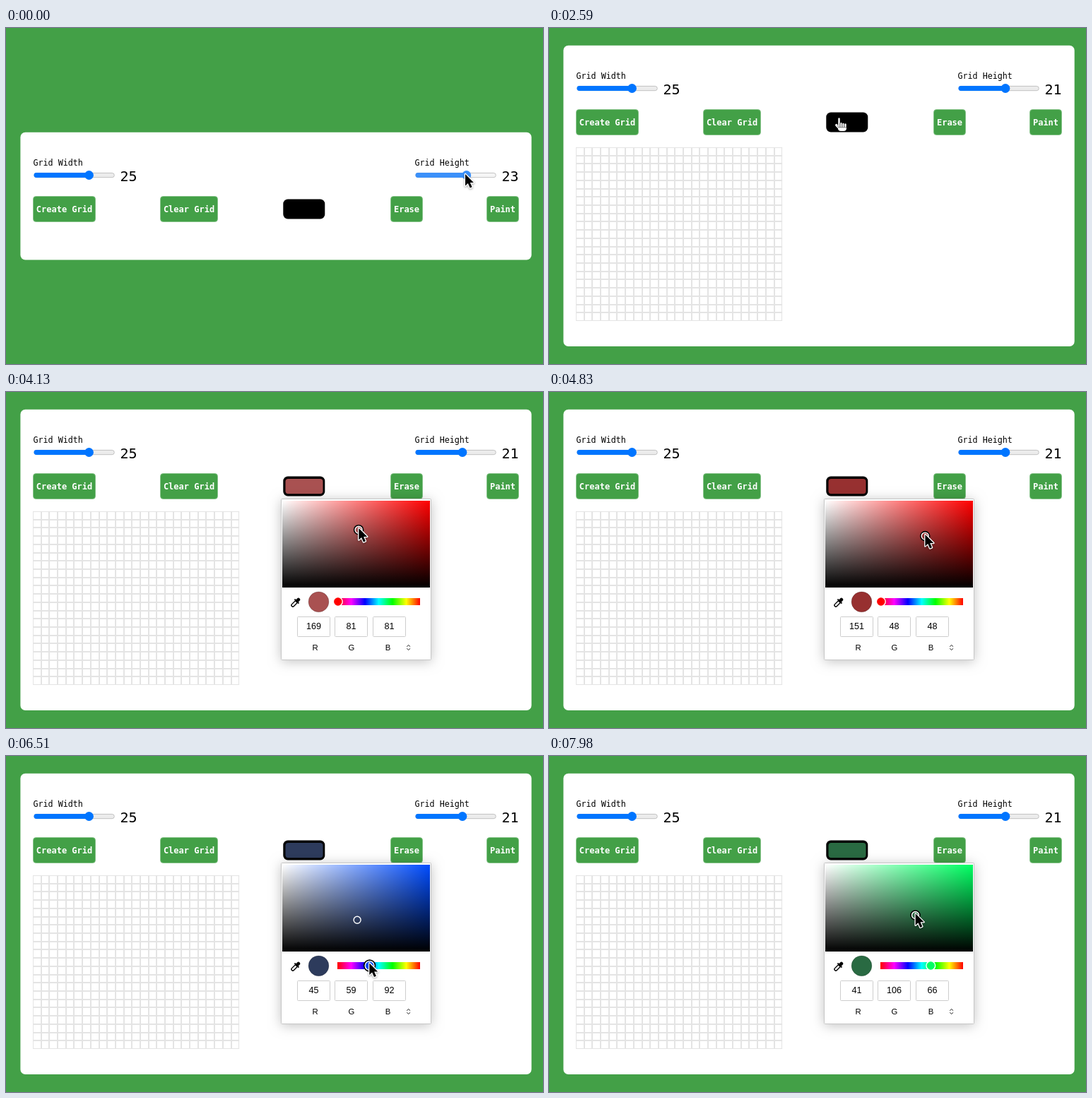
Write an HTML page with a canvas that moves like this. It is 760x476 px and loops after 8000 ms.

```html
<!DOCTYPE html>
<html lang="en">
<head>
<meta charset="utf-8">
<title>Pixel grid</title>
<style>
html, body { margin: 0; width: 100%; height: 100%; overflow: hidden; background: #43a047; }
canvas { display: block; }
</style>
</head>
<body>
<canvas id="stage" width="760" height="476"></canvas>
<script>
const ctx = document.getElementById('stage').getContext('2d');
const LOOP = 8000, STEP = 70;
const GREEN = '#43a047', BLUE = '#0075ff';
const MONO = '"DejaVu Sans Mono", monospace';
const SANS = '"Liberation Sans", Arial, sans-serif';

// Moments of the session, in ms
const RELEASE = 700, CREATE = 1960, OPEN = 2870;
const PRESS = 3500, LIFT = 6090, HUE_PRESS = 6300, HUE_LIFT = 7140, PRESS_AGAIN = 7560;

const AREA = { x: 391, y: 154, w: 209, h: 123 };
const HUE = { x: 469, y: 292, w: 117, h: 10 };

// Pointer moves: start, end, then where it arrives
const HOME = { x: 650, y: 207 };
const MOVES = [
  [210, 490, 644, 208],
  [630, 1260, 88, 263],
  [1330, 1680, 93, 258.5],
  [2100, 2310, 400, 163],
  [2380, 2590, 411, 128],
  [2800, PRESS, 450, 212],
  [PRESS, 4130, 499.3, 193],
  [4270, 5110, 544, 205],
  [5180, 5530, 529.8, 226.7],
  [5530, LIFT, 497.3, 230.1],
  [LIFT, HUE_PRESS, 470, 294],
  [HUE_PRESS, 6510, 514.3, 293.5],
  [6510, HUE_LIFT, 540, 294],
  [7210, 7490, 545, 240],
  [7490, 7980, 518.7, 223.3]
];

const clamp = (v, lo, hi) => Math.min(hi, Math.max(lo, v));
const ease = k => k * k * (3 - 2 * k);

function pointer(t) {
  let { x, y } = HOME;
  for (const [from, to, endX, endY] of MOVES) {
    const k = ease(clamp((t - from) / (to - from), 0, 1));
    x += (endX - x) * k;
    y += (endY - y) * k;
  }
  return { x, y };
}

function hsv(h, s, v) {
  const part = n => {
    const k = (n + h / 60) % 6;
    return Math.round(255 * v * (1 - s * clamp(Math.min(k, 4 - k), 0, 1)));
  };
  return [part(5), part(3), part(1)];
}
const css = c => `rgb(${c.join()})`;

function pickedColor(t) {
  let hue = 360, s = 0, v = 0;
  if (t >= HUE_PRESS) {
    const x = pointer(Math.min(t, HUE_LIFT)).x - 0.5;
    hue = 360 * (1 - clamp((x - HUE.x) / HUE.w, 0, 1));
  }
  if (t >= PRESS) {
    const p = pointer(t < PRESS_AGAIN ? Math.min(t, LIFT) : t);
    s = clamp((p.x + 0.5 - AREA.x) / AREA.w, 0, 1);
    v = 1 - clamp((p.y + 2.5 - AREA.y) / AREA.h, 0, 1);
  }
  return { hue, s, v, rgb: hsv(hue, s, v) };
}

function paint(fill, stroke, line) {
  if (fill) { ctx.fillStyle = fill; ctx.fill(); }
  if (stroke) { ctx.strokeStyle = stroke; ctx.lineWidth = line; ctx.stroke(); }
}

function box(x, y, w, h, r, fill, stroke, line = 1) {
  ctx.beginPath();
  ctx.roundRect(x, y, w, h, r);
  paint(fill, stroke, line);
}

function disc(x, y, r, fill, stroke, line = 1) {
  ctx.beginPath();
  ctx.arc(x, y, r, 0, Math.PI * 2);
  paint(fill, stroke, line);
}

function text(str, x, y, font, color = '#000', align = 'left') {
  ctx.font = font;
  ctx.fillStyle = color;
  ctx.textAlign = align;
  ctx.fillText(str, x, y);
}

function slider(label, value, x, top, pressed) {
  const color = pressed ? '#3b90f9' : BLUE;
  const thumb = x + 6 + value * 2.88;
  text(label, x - 1, top + 47, '11.7px ' + MONO);
  box(x + 0.4, top + 57.4, 113.4, 6.3, 3.2, pressed ? '#f5f5f5' : '#ececec', '#b5b5b5', 0.8);
  box(x, top + 57.1, thumb - x, 6.9, 3.4, color);
  disc(thumb, top + 60.5, 6.4, color);
  text(value, x + 122, top + 69, '20px ' + MONO);
}

function button(label, x, w, top) {
  box(x, top + 90.5, w, 36, 4, GREEN, '#7fc183', 0.8);
  text(label, x + w / 2, top + 113, 'bold 12px ' + MONO, '#fff', 'center');
}

function grid(x, y, cols, rows, w, h) {
  ctx.fillStyle = '#e4e4e4';
  const lines = (n, size, drawLine) => {
    for (let i = 0; i <= n; i++) drawLine(Math.round(i * size / n) - (i ? 1 : 0), i % n ? 2 : 1);
  };
  lines(cols, w, (at, thick) => ctx.fillRect(x + at, y, thick, h));
  lines(rows, h, (at, thick) => ctx.fillRect(x, y + at, w, thick));
}

function shade({ x, y, w, h }, vertical, stops) {
  const g = ctx.createLinearGradient(x, y, vertical ? x : x + w, vertical ? y + h : y);
  stops.forEach((c, i) => g.addColorStop(i / (stops.length - 1), c));
  ctx.fillStyle = g;
  ctx.fillRect(x, y, w, h);
}

function knob(x, y, r, fill, focused) {
  if (focused) disc(x, y, r + 1.3, null, '#000', 2);
  disc(x, y, r, fill, '#fff', 1.4);
}

function dropper() {
  ctx.save();
  ctx.translate(409.5, 298.5);
  ctx.rotate(Math.PI / 4);
  box(-2.4, -8.5, 4.8, 6, 2, '#000');
  box(-4.3, -3.8, 8.6, 2, 0.6, '#000');
  box(-2, -2, 4, 9, [0, 0, 2, 2], null, '#000', 1.4);
  ctx.restore();
}

function chevrons(x, y) {
  ctx.beginPath();
  for (const d of [-1, 1]) {
    ctx.moveTo(x - 2.4, y + d * 1.3);
    ctx.lineTo(x, y + d * 3.5);
    ctx.lineTo(x + 2.4, y + d * 1.3);
  }
  paint(null, '#222', 1);
}

function picker({ hue, s, v, rgb }, hueFocus) {
  const pure = css(hsv(hue, 1, 1));
  ctx.save();
  ctx.shadowColor = 'rgba(0,0,0,0.25)';
  ctx.shadowBlur = 17;
  ctx.shadowOffsetY = 2;
  box(389.5, 151.5, 212, 228, 1, '#fff');
  ctx.restore();
  box(389.5, 151.5, 212, 228, 1, null, '#c6c6c6');

  shade(AREA, false, ['#fff', pure]);
  shade(AREA, true, ['rgba(0,0,0,0)', '#000']);
  knob(AREA.x - 0.7 + AREA.w * s, AREA.y - 0.3 + AREA.h * (1 - v), 5, null, !hueFocus);

  dropper();
  disc(442.5, 297.3, 14.4, css(rgb), 'rgba(0,0,0,0.25)', 0.7);
  const rainbow = Array.from({ length: 7 }, (_, i) => css(hsv(360 - i * 60, 1, 1)));
  shade(HUE, false, rainbow);
  knob(HUE.x + 0.8 + HUE.w * (1 - hue / 360), 297, 6.4, pure, hueFocus);

  ['R', 'G', 'B'].forEach((name, i) => {
    const x = Math.floor(412.5 + i * 53.3) + 0.5;
    box(x, 318.5, 46, 28, 1, '#fff', '#cdcdcd');
    text(rgb[i], x + 23, 336, '12.6px ' + SANS, '#000', 'center');
    text(name, 437.5 + i * 51.5, 366, '11.3px ' + SANS, '#000', 'center');
  });
  chevrons(569.7, 362);
}

const ARROW = new Path2D('M0 0V16.5L3.8 13L6.7 19.6L9.6 18.3L6.8 12H11.9Z');

function arrow() {
  ctx.lineJoin = 'round';
  ctx.shadowColor = 'rgba(0,0,0,0.35)';
  ctx.shadowBlur = 3;
  ctx.shadowOffsetY = 1;
  ctx.strokeStyle = '#fff';
  ctx.lineWidth = 2.6;
  ctx.stroke(ARROW);
  ctx.shadowColor = 'transparent';
  ctx.fillStyle = '#000';
  ctx.fill(ARROW);
}

function hand() {
  ctx.save();
  ctx.translate(-5.5, 8.5);
  ctx.rotate(-0.75);
  box(-1.5, 0, 3.4, 9, 1.7, '#fff');
  ctx.restore();
  box(-2, 8.5, 12, 9.5, [1, 1, 4, 4], '#fff');
  for (let i = 0; i < 4; i++) {
    const y = i ? 5 + i * 0.7 : -1;
    box(-2 + i * 3, y, 3, 13 - y, 1.5, '#fff', '#000', 0.6);
  }
}

function drawPointer({ x, y }) {
  const overSwatch = x > 392 && x < 452 && y < 148;
  ctx.save();
  ctx.translate(x, y);
  if (overSwatch) hand();
  else arrow();
  ctx.restore();
}

function draw(t) {
  const created = t >= CREATE;
  const top = created ? 25 : 148;
  const height = t < 350 ? 23 : t < 490 ? 22 : 21;
  const color = pickedColor(t);

  ctx.fillStyle = GREEN;
  ctx.fillRect(0, 0, 760, 476);
  box(20.4, top - 0.3, 723.3, created ? 426.3 : 180.8, 7, '#fff');

  slider('Grid Width', 25, 39.5, top, false);
  slider('Grid Height', height, 579.5, top, t < RELEASE);
  button('Create Grid', 38.5, 88, top);
  button('Clear Grid', 218.5, 81, top);
  button('Erase', 544.5, 45, top);
  button('Paint', 680.5, 45, top);
  box(392.3, top + 94.5, 59, 28, 6.5, '#000');
  box(395.5, top + 98, 53, 21.3, 4, css(color.rgb));

  if (created) grid(38, 169, 25, 21, 292.2, 246);
  if (t >= OPEN) picker(color, t >= HUE_PRESS && t < PRESS_AGAIN);
  drawPointer(pointer(t));
}

const start = performance.now();
function frame() {
  const t = (performance.now() - start) % LOOP;
  draw(Math.floor(t / STEP) * STEP);
  requestAnimationFrame(frame);
}
frame();
</script>
</body>
</html>
```
